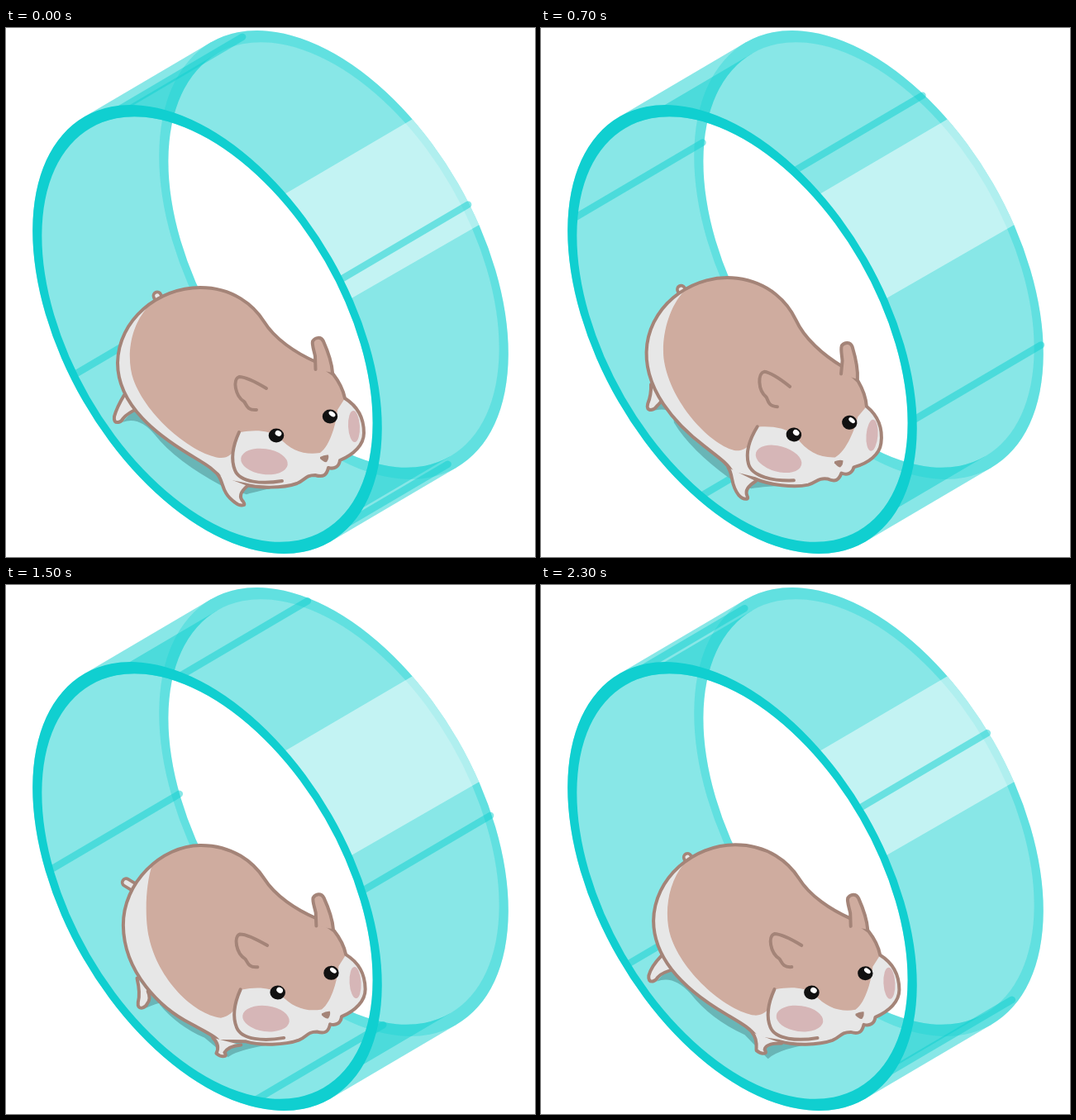
Recreate the animation shown at these times as an HTML page with a canvas. Size 640 px wide and 640 px high, loop 2400 ms.

```html
<!DOCTYPE html>
<html lang="en">
<head>
<meta charset="utf-8">
<title>Hamster wheel</title>
<style>
  html, body { margin: 0; width: 100%; height: 100%; overflow: hidden; background: #fff; }
  canvas { display: block; width: 100%; height: 100%; }
</style>
</head>
<body>
<canvas id="stage" width="640" height="640"></canvas>
<script>
const ctx = document.getElementById('stage').getContext('2d');
const TAU = Math.PI * 2;
const LOOP = 2400, STEP = 100, QUARTER = 1200;

const TEAL = '#10cfd0', MINT = '#88e7e7', DEEP = '#4cdbdb';
const LINE = '#a48478', FUR = '#cfac9f', BELLY = '#e7e7e7', BLUSH = '#d6b6b7', SHADE = '#69b5b6';

// Wheel geometry: two tilted ellipses joined along the axle.
const FRONT = [243.5, 364.5], AXLE = [153, -90], TILT = -Math.PI / 6;
const BACK = [FRONT[0] + AXLE[0], FRONT[1] + AXLE[1]];
const OUTER = [173.5, 297], INNER = [164.3, 281.5], RUNG = [168, 289];
const MINOR = [Math.cos(TILT), Math.sin(TILT)], MAJOR = [-MINOR[1], MINOR[0]];

function ellipse(c, r) {
  const p = new Path2D();
  p.ellipse(c[0], c[1], r[0], r[1], TILT, 0, TAU);
  return p;
}

function rim(c) {
  const p = ellipse(c, OUTER);
  p.addPath(ellipse(c, INNER));
  return p;
}

function polygon(points) {
  const p = new Path2D();
  points.forEach(q => p.lineTo(q[0], q[1]));
  p.closePath();
  return p;
}

// Strip between the points where the tangents touch both ellipses.
function strip(ry) {
  const at = (c, s) => [c[0] + s * ry * MAJOR[0], c[1] + s * ry * MAJOR[1]];
  return polygon([at(FRONT, -1), at(BACK, -1), at(BACK, 1), at(FRONT, 1)]);
}

function fill(path, color, rule = 'nonzero') {
  ctx.fillStyle = color;
  ctx.fill(path, rule);
}

function within(path, draw) {
  ctx.save();
  ctx.clip(path);
  draw();
  ctx.restore();
}

const frontIn = ellipse(FRONT, INNER), backIn = ellipse(BACK, INNER);
const frontOut = ellipse(FRONT, OUTER), backOut = ellipse(BACK, OUTER);
const frontRim = rim(FRONT), backRim = rim(BACK);
const outerStrip = strip(OUTER[1]), innerStrip = strip(INNER[1]);
const gleam = polygon([[332, 204], [500, 105.5], [590, 228], [411, 331]]);

// Running length of the rung ellipse, so rungs are spaced evenly along it.
const lengths = [0];
for (let i = 0; i < 720; i++) {
  const a = (i + 0.5) / 720 * TAU;
  lengths.push(lengths[i] + Math.hypot(RUNG[0] * Math.sin(a), RUNG[1] * Math.cos(a)));
}

function angleAt(turn) {
  const want = (turn % 1) * lengths[720];
  let i = 1;
  while (lengths[i] < want) i++;
  return (i - (lengths[i] - want) / (lengths[i] - lengths[i - 1])) / 720 * TAU;
}

function drawRungs(t) {
  const p = t % QUARTER / QUARTER;
  const advance = 0.09 + p * (0.85 + 0.12 * p);
  ctx.strokeStyle = 'rgba(16,207,208,.5)';
  ctx.lineWidth = 8.5;
  ctx.lineCap = 'round';
  for (let i = 0; i < 4; i++) {
    let a = angleAt((advance + i) / 4);
    a -= 0.13 * Math.max(0, Math.sin(a));
    const u = RUNG[0] * Math.cos(a) + 4, v = RUNG[1] * Math.sin(a);
    const x = BACK[0] + u * MINOR[0] + v * MAJOR[0];
    const y = BACK[1] + u * MINOR[1] + v * MAJOR[1];
    ctx.beginPath();
    ctx.moveTo(x - AXLE[0], y - AXLE[1]);
    ctx.lineTo(x, y);
    ctx.stroke();
  }
}

function drawWheel(t) {
  [outerStrip, frontOut, backOut].forEach(p => fill(p, MINT));
  fill(innerStrip, DEEP);
  fill(frontIn, MINT);
  fill(backIn, MINT);
  within(frontIn, () => fill(backIn, '#fff'));
  fill(backRim, 'rgba(16,207,208,.32)', 'evenodd');
  within(backOut, () => fill(gleam, 'rgba(255,255,255,.5)'));
  drawRungs(t);
}

// Poses at key times; values in between follow a smooth looping curve.
const TIMES = [0, 400, 700, 1200, 1500, 2000, 2300];
const POSE = {
  lean: [0, .58, 1, .46, -.08, -.2, -.02],
  twist: [0, .5, .35, 0, 1, .9, .15],
  handX: [285, 257, 278, 284, 260, 264, 268],
  handY: [577, 562, 577, 577, 569, 572, 566],
  footX: [133, 142, 149, 134, 160, 160, 132],
  footY: [477, 487, 485, 480, 510, 505, 479]
};

function curve(values, t) {
  const n = TIMES.length;
  const time = i => TIMES[(i + n) % n] + LOOP * Math.floor(i / n);
  const value = i => values[(i + n) % n];
  let i = n - 1;
  while (TIMES[i] > t) i--;
  const span = time(i + 1) - time(i), s = (t - time(i)) / span;
  const slope = j => (value(j + 1) - value(j - 1)) / (time(j + 1) - time(j - 1)) * span;
  const a = value(i), b = value(i + 1), r = s * s * (3 - 2 * s);
  return a + (b - a) * r + slope(i) * s * (1 - s) ** 2 - slope(i + 1) * s * s * (1 - s);
}

function outline(path, color) {
  if (color) fill(path, color);
  ctx.strokeStyle = LINE;
  ctx.lineWidth = 4;
  ctx.lineCap = ctx.lineJoin = 'round';
  ctx.stroke(path);
}

function spot(x, y, rx, ry, color, turn = 0) {
  ctx.beginPath();
  ctx.ellipse(x, y, rx, ry, turn, 0, TAU);
  ctx.fillStyle = color;
  ctx.fill();
}

const earLeft = new Path2D('M315 436C305 430 290 422 282 422C274 425 277 445 288 452C291 455 291 463 303 462');
const earRight = new Path2D('M374.5 413L374 397C372 388 370 383 371 379C374 374 381 373 384 379C388 388 394 402 395 417');
const cheek = new Path2D('M282 489C276 502 271 520 277 535C283 550 310 552 334 548');
const nose = new Path2D('M380 519Q385 516 390 516.5Q391 521 388 525Q385 526 380 521Z');

const bodyPath = w => new Path2D(
  `M${135 + 6 * w} ${405 + 5 * w}C${136 + 5 * w} ${353 + 5 * w} ${184 + 4 * w} 314 235 314
   C275 314 300 336 312 355C325 376 350 393 375 404L396 419C403 428 408 438 410 448
   C426 458 433 472 433 490C433 504 421 516 404 523C403 531 397 534 390 532
   C388 541 384 544 374 541C362 541 362 547 352 551C335 557 305 557 288 552
   L${262 - 7 * w} ${547 + 4 * w}C252 ${533 + 13 * w} 240 ${527 + 13 * w} 222 ${516 + 14 * w}
   C${186 - w} ${494 + 17 * w} ${135 + 6 * w} ${458 + 9 * w} ${135 + 6 * w} ${405 + 5 * w}Z`);

const furPath = w => new Path2D(
  `M${173 + 4 * w} 336C${148 + 20 * w} 362 ${146 + 21 * w} 402 ${154 + 18 * w} 425
   C${170 + 12 * w} ${470 + 5 * w} 225 ${515 + 4 * w} 258 ${520 + 3 * w}
   C268 521 275 515 276 508C277 498 280 490 284 489C300 486 318 486 330 495
   C345 512 362 517 380 514C393 505 400 475 401 462L410 448L430 440L420 300L180 280Z`);

const handPath = (w, x, y) => new Path2D(
  `M${256 - 8 * w} ${540 + 7 * w}C${264 - 8 * w} ${550 + 5 * w} ${260 - 6 * w} 562 ${x - 8} ${y - 3}
   Q${x - 2} ${y + 2} ${x + 3} ${y}Q${x + 4} ${y - 1} ${x + 2} ${y - 4}
   Q${266 + .48 * (x - 258)} ${y - 12} ${292 - 10 * w} ${554 + 2 * w}`);

const footPath = (w, x, y) => new Path2D(
  `M${143 + 14 * w} ${444 + 30 * w}Q${x + 1} ${y - 18} ${x - 2} ${y - 7}
   Q${x - 3} ${y + 1} ${x + 3} ${y}Q${x + 7} ${y - 1} ${x + 9} ${y - 5}
   Q${x + 14} ${y - 11} ${160 + 10 * w} ${460 + 30 * w}`);

const shadowPath = (w, hx, hy, fx, fy) => new Path2D(
  `M${fx + 8} ${fy}Q${fx + 28} ${fy - 8} ${180 + 4 * w} ${492 + 14 * w}
   Q205 ${524 + 8 * w} ${hx - 22} ${hy - 22}L${hx + 6} ${573 - .8 * (hy - 566)}
   Q${hx + 20} 560 340 553L250 480L165 450Z`);

function drawTail(w) {
  const x = 183 - 38 * w, y = 324 + 34 * w;
  ctx.lineCap = 'round';
  for (const [width, color] of [[13, LINE], [5.5, BELLY]]) {
    ctx.beginPath();
    ctx.moveTo(x, y);
    ctx.lineTo(x + 7 + 9 * w, y + 16 - 6 * w);
    ctx.lineWidth = width;
    ctx.strokeStyle = color;
    ctx.stroke();
  }
}

function drawFace() {
  outline(earRight, FUR);
  outline(earLeft);
  spot(312.5, 524.5, 28.5, 15.5, BLUSH, 0.14);
  spot(421, 482, 7, 19, BLUSH, -0.05);
  outline(cheek);
  spot(327, 493, 9.3, 8.5, '#111');
  spot(329.5, 490.3, 4, 3.3, '#fff', 0.5);
  spot(392, 470, 9.2, 8.5, '#111');
  spot(394.5, 467, 4.4, 2.6, '#fff', 0.6);
  fill(nose, LINE);
}

function drawHamster(t) {
  const pose = {};
  for (const key in POSE) pose[key] = curve(POSE[key], t);
  const { lean, twist, handX, handY, footX, footY } = pose;
  const body = bodyPath(twist);

  ctx.save();
  ctx.translate(325, 325);
  ctx.rotate(lean * 0.126);
  ctx.translate(-325, -325);
  fill(shadowPath(twist, handX, handY, footX, footY), SHADE);
  drawTail(twist);
  outline(footPath(twist, footX, footY), BELLY);
  fill(body, BELLY);
  within(body, () => fill(furPath(twist), FUR));
  outline(body);
  outline(handPath(twist, handX, handY), BELLY);
  drawFace();
  ctx.restore();
}

function frame() {
  const t = Math.floor(performance.now() % LOOP / STEP) * STEP;
  ctx.fillStyle = '#fff';
  ctx.fillRect(0, 0, 640, 640);
  drawWheel(t);
  drawHamster(t);
  fill(frontRim, TEAL, 'evenodd');
  requestAnimationFrame(frame);
}
frame();
</script>
</body>
</html>
```
